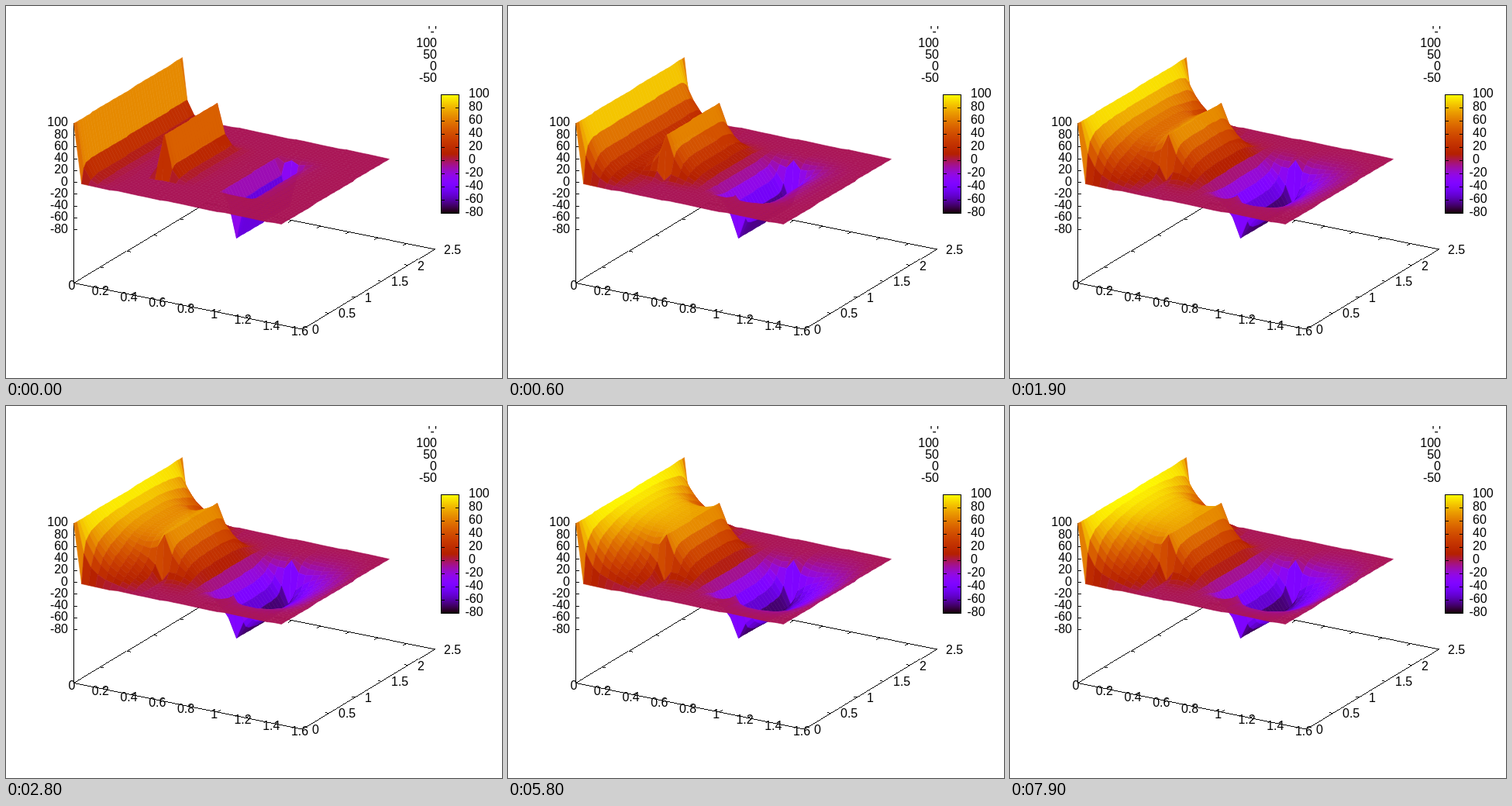
An HTML page with a canvas that plays this animation: 640x480 px, repeating every 8 s.

```html
<!DOCTYPE html>
<html>
<head>
<meta charset="utf-8">
<style>
html, body { margin: 0; width: 100%; height: 100%; overflow: hidden; background: #fff }
canvas { display: block }
</style>
</head>
<body>
<canvas id="stage" width="640" height="480"></canvas>
<script>
const ctx = document.getElementById('stage').getContext('2d');
const NX = 30, NY = 42, STEP = 0.05, FRAMES = 80;
const ZMIN = -80, ZMAX = 100;
const LEFT = 87.4, FLOOR = 357, ZERO = 227.2, ZSCALE = 0.7625;

// Plate with one hot edge and two held columns, each with a warm or cold middle part.
function fixedValue(i, j) {
  if (i === 0) return 100;
  if (i === NX - 1 || j === 0 || j === NY - 1) return 0;
  const inBar = j >= 10 && j <= 30;
  if (i === 9) return inBar ? 75 : 0;
  if (i === 19) return inBar ? -75 : 0;
  return null;
}

// One in-place relaxation sweep per frame.
function solve() {
  const fixed = [], states = [];
  for (let i = 0; i < NX; i++) {
    fixed.push(Array.from({ length: NY }, (_, j) => fixedValue(i, j)));
  }
  const u = fixed.map(row => row.map(v => v ?? 0));
  for (let n = 0; n < FRAMES; n++) {
    for (let i = 1; i < NX - 1; i++) {
      for (let j = 1; j < NY - 1; j++) {
        if (fixed[i][j] === null) {
          u[i][j] = (u[i - 1][j] + u[i + 1][j] + u[i][j - 1] + u[i][j + 1]) / 4;
        }
      }
    }
    states.push(u.map(row => row.slice()));
  }
  return states;
}

function color(z) {
  const g = (z - ZMIN) / (ZMAX - ZMIN);
  const rgb = [Math.sqrt(g), g ** 3, Math.max(0, Math.sin(2 * Math.PI * g))];
  return `rgb(${rgb.map(c => Math.round(255 * c)).join()})`;
}

const project = (x, y, base) => [
  LEFT + 184.3 * x + 68.1 * y,
  base + 37.3 * x - 41.3 * y
];
const floorPoint = (x, y) => project(x, y, FLOOR);
const surfacePoint = (x, y, z) => project(x, y, ZERO - ZSCALE * z).map(Math.round);

// Hard-edged one-pixel line
function line([x0, y0], [x1, y1]) {
  const n = Math.max(1, Math.round(Math.max(Math.abs(x1 - x0), Math.abs(y1 - y0))));
  for (let k = 0; k <= n; k++) {
    ctx.fillRect(Math.round(x0 + (x1 - x0) * k / n), Math.round(y0 + (y1 - y0) * k / n), 1, 1);
  }
}

function tick([x, y], dx, dy) {
  line([x, y], [x + dx, y + dy]);
}

function text(s, x, mid, align) {
  ctx.textAlign = align;
  ctx.fillText(s, x, Math.round(mid + 5));
}

function drawAxes() {
  const corners = [[0, 0], [1.6, 0], [1.6, 2.5], [0, 2.5]].map(p => floorPoint(...p));
  corners.forEach((p, k) => line(p, corners[(k + 1) % 4]));
  line([LEFT, ZERO - ZSCALE * ZMAX], [LEFT, FLOOR]);

  for (let n = 0; n <= 8; n++) {
    const x = n / 5;
    tick(floorPoint(x, 0), 4, -2.4);
    tick(floorPoint(x, 2.5), -4, 2.4);
    text(String(x), 85 + 36.75 * n, 361 + 7.4 * n, 'center');
  }
  for (let n = 0; n <= 5; n++) {
    const y = n / 2;
    tick(floorPoint(0, y), 4, 0.8);
    tick(floorPoint(1.6, y), -4, -0.8);
    text(String(y), 395 + 34 * n, 418 - 20.6 * n, 'left');
  }
  for (let z = ZMIN; z <= ZMAX; z += 20) {
    const y = ZERO - ZSCALE * z;
    tick([LEFT, y], 4, 0);
    text(String(z), 80, y - 0.7, 'right');
  }
}

function drawLegend() {
  text("'-'", 556, 33, 'right');
  [100, 50, 0, -50].forEach((v, k) => text(String(v), 556, 48 + 15 * k, 'right'));

  const top = 114, height = 153;
  for (let k = 0; k < height; k++) {
    ctx.fillStyle = color(ZMAX - (ZMAX - ZMIN) * k / height);
    ctx.fillRect(561, top + k, 24, 1);
  }
  ctx.fillStyle = '#000';
  const box = [[561, top], [584, top], [584, top + height], [561, top + height]];
  box.forEach((p, k) => line(p, box[(k + 1) % 4]));
  for (let z = ZMIN; z <= ZMAX; z += 20) {
    const y = top + height * (ZMAX - z) / (ZMAX - ZMIN);
    tick([561, y], 4, 0);
    tick([584, y], -4, 0);
    text(String(z), z < 0 ? 592.5 : 597, y - 1, 'left');
  }
}

// Far cells first, so nearer ones cover them.
function drawSurface(u) {
  ctx.save();
  ctx.translate(0.5, 0.5);
  ctx.lineWidth = 0.6;
  ctx.lineJoin = 'round';
  for (let j = NY - 2; j >= 0; j--) {
    for (let i = 0; i < NX - 1; i++) {
      const cell = [[i, j], [i + 1, j], [i + 1, j + 1], [i, j + 1]];
      const mean = cell.reduce((sum, [a, b]) => sum + u[a][b], 0) / 4;
      ctx.fillStyle = ctx.strokeStyle = color(mean);
      ctx.beginPath();
      for (const [a, b] of cell) ctx.lineTo(...surfacePoint(a * STEP, b * STEP, u[a][b]));
      ctx.closePath();
      ctx.fill();
      ctx.stroke();
    }
  }
  ctx.restore();
}

function draw(u) {
  ctx.fillStyle = '#fff';
  ctx.fillRect(0, 0, 640, 480);
  ctx.fillStyle = '#000';
  ctx.font = '16px "Liberation Sans", Arial, sans-serif';
  drawAxes();
  drawLegend();
  drawSurface(u);
}

const states = solve();
const start = performance.now();
let shown = -1;

function loop() {
  const frame = Math.floor((performance.now() - start) / 100) % FRAMES;
  if (frame !== shown) draw(states[shown = frame]);
  requestAnimationFrame(loop);
}
loop();
</script>
</body>
</html>
```
